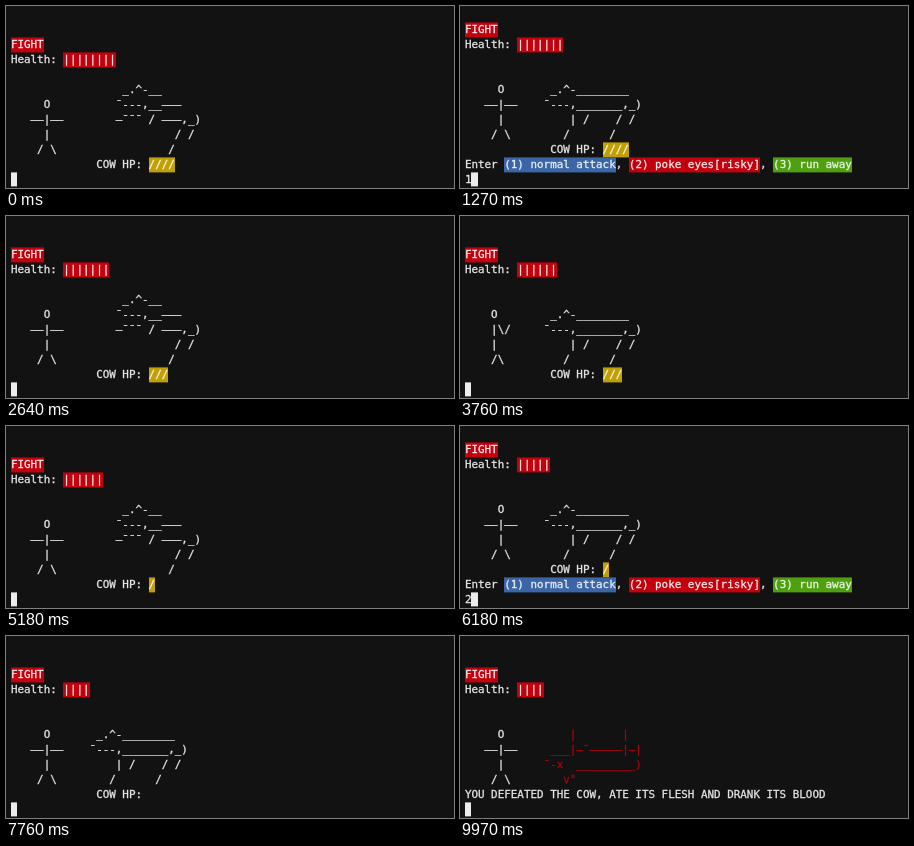
Recreate the animation shown at these times as an HTML page. Size 448x182 px, loop 10000 ms.

```html
<!DOCTYPE html>
<html lang="en">
<head>
<meta charset="utf-8">
<title>Cow fight</title>
<style>
  html, body { margin: 0; width: 100%; height: 100%; overflow: hidden; background: #121212; }
  /* Slight softening and extra weight: the terminal is seen scaled down. */
  #term {
    position: absolute; left: 4.9px; top: 2px; margin: 0;
    font: 10.9px/15px "DejaVu Sans Mono", monospace;
    font-variant-ligatures: none; color: #e6e6e6; white-space: pre;
    -webkit-text-stroke: 0.3px;
    transform: translateY(-0.6px); filter: blur(0.4px);
  }
  .row { height: 15px; }
  .row span { display: inline-block; height: 15px; vertical-align: top; }
  .red { background: #c3000d; color: #f8ecec; }
  .blue { background: #3b65a5; color: #e8eef6; }
  .green { background: #4f9f10; color: #ecf6e4; }
  .gold { background: #c0a005; color: #fbf6e0; }
  .blood { color: #a80410; }
  .row .cursor { background: #ececec; height: 14px; }
</style>
</head>
<body>
<pre id="term"></pre>
<script>
const LOOP = 10000;
const ART_COL = 12;

const MEN = {
  stand: ["", "     O", "   ——|——", "     |", "    / \\"],
  punch: ["", "    O", "    |\\/", "    |", "    /\\"],
};

const COWS = {
  stand: ["", " _.^-________", "¯---,_______,_)", "    | /    / /", "   /      /"],
  charge: ["     _.^-__", "    ¯---,__———", "    —¯¯¯ / ———,_)", "             / /", "            /"],
  dead: ["", "    |       |", " ___|—¯—————|—|", "¯-x  _________)", "   v\""],
};

// start ms, man, cow, health, cow HP, typed input (only while the prompt is open)
const STEPS = [
  [0, "stand", "charge", 8, 4],
  [270, "stand", "stand", 7, 4, ""],
  [1150, "stand", "stand", 7, 4, "1"],
  [1330, "punch", "stand", 7, 4],
  [1820, "stand", "stand", 7, 3],
  [2300, "stand", "charge", 7, 3],
  [2910, "stand", "stand", 6, 3, ""],
  [3520, "stand", "stand", 6, 3, "2"],
  [3760, "punch", "stand", 6, 3],
  [4250, "stand", "stand", 6, 1],
  [4850, "stand", "charge", 6, 1],
  [5340, "stand", "stand", 5, 1, ""],
  [5940, "stand", "stand", 5, 1, "2"],
  [6480, "punch", "stand", 5, 1],
  [6970, "stand", "stand", 5, 0],
  [7450, "stand", "stand", 4, 0],
  [8030, "stand", "dead", 4, 0],
];

const term = document.getElementById("term");
const tag = (cls, text) => text ? `<span class="${cls}">${text}</span>` : "";

const PROMPT = "Enter " + [
  tag("blue", "(1) normal attack"),
  tag("red", "(2) poke eyes[risky]"),
  tag("green", "(3) run away"),
].join(", ");

function screen([, man, cow, health, hp, input]) {
  const dead = cow === "dead";
  const asking = input !== undefined;
  const art = MEN[man].map((line, i) => {
    const beast = COWS[cow][i];
    return line.padEnd(ART_COL) + (dead ? tag("blood", beast) : beast);
  });
  const rows = [
    "", "",
    tag("red", "FIGHT"),
    "Health: " + tag("red", "|".repeat(health)),
    "",
    ...art,
    dead ? "YOU DEFEATED THE COW, ATE ITS FLESH AND DRANK ITS BLOOD"
         : " ".repeat(13) + "COW HP: " + tag("gold", "/".repeat(hp)),
  ];
  if (asking) rows.push(PROMPT);
  rows.push((input || "") + tag("cursor", " "));
  return rows.slice(-12).map(row => `<div class="row">${row}</div>`).join("");
}

let shown = null;
function draw() {
  const t = performance.now() % LOOP;
  const step = STEPS.findLast(s => s[0] <= t);
  if (step !== shown) {
    shown = step;
    term.innerHTML = screen(step);
  }
  requestAnimationFrame(draw);
}
draw();
</script>
</body>
</html>
```
